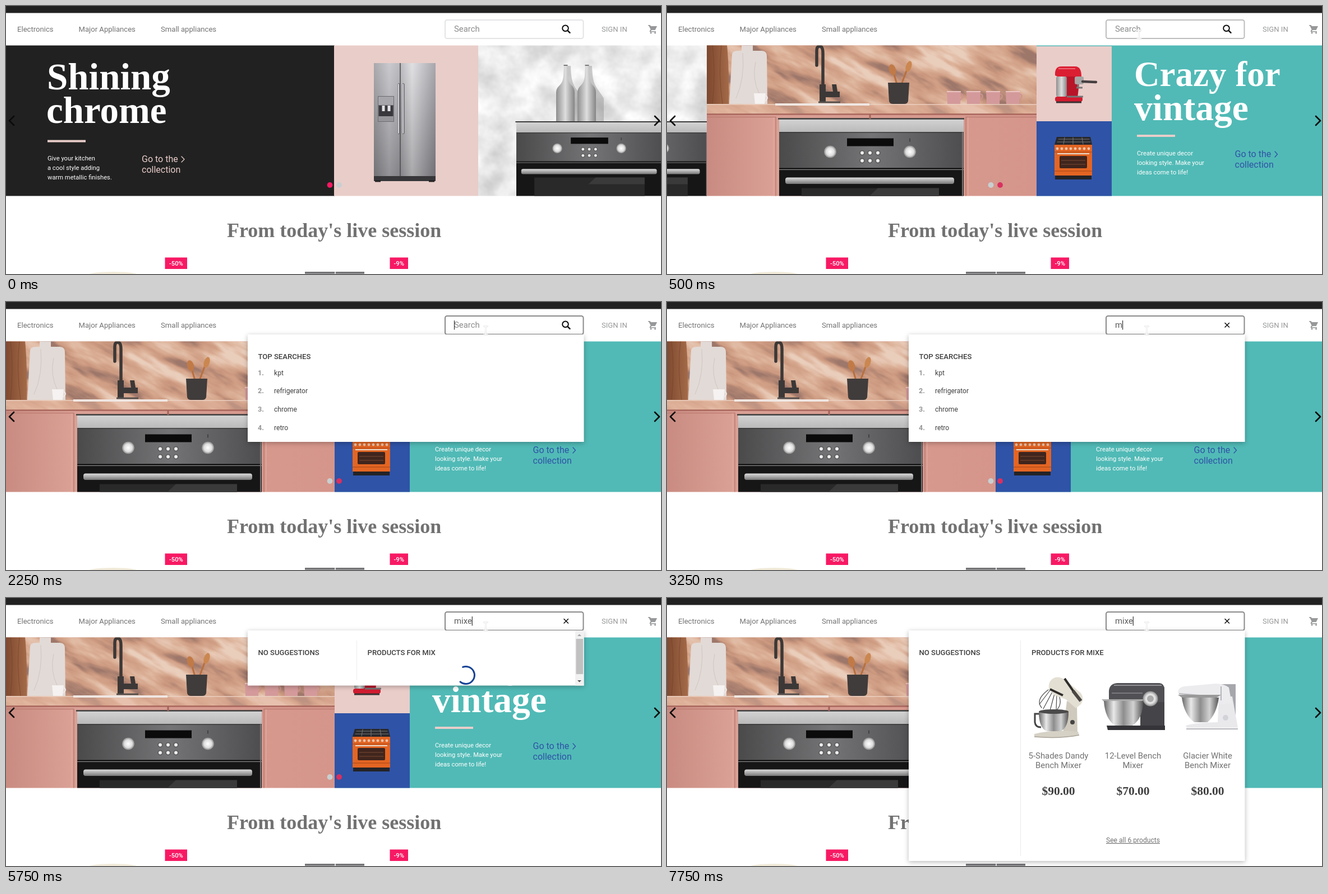
Recreate the animation shown at these times as an HTML page. Size 1168 px wide and 479 px high, loop 8 s.

```html
<!DOCTYPE html>
<html lang="en">
<head>
<meta charset="utf-8">
<title>Appliance store search</title>
<style>
html, body { margin: 0; width: 100%; height: 100%; overflow: hidden; background: #fff; }
svg { display: block; width: 100%; height: 100%; }
text { font: 13.1px Roboto, sans-serif; fill: #727273; white-space: pre; }
.serif { font-family: "Liberation Serif", serif; font-weight: 700; }
.hero { font-size: 67px; fill: #fff; }
.small { font-size: 11.2px; fill: #fff; }
.link { font-size: 16px; }
.head { font-weight: 500; fill: #3f3f40; }
.item { font-size: 12.1px; fill: #3f3f40; }
.num { font-size: 12.6px; font-weight: 700; fill: #979899; }
.badge { font-size: 11.3px; font-weight: 500; fill: #fff; }
.field { font-size: 14.9px; }
.name { font-size: 14.9px; text-anchor: middle; }
.price { font-size: 21.5px; fill: #3f3f40; text-anchor: middle; }
.line { fill: none; stroke-linecap: round; stroke-linejoin: round; }
#sheet { filter: drop-shadow(0 2px 4px rgba(0,0,0,.28)); }
</style>
</head>
<body>
<svg viewBox="0 0 1168 479" preserveAspectRatio="none">
<defs>
  <clipPath id="heroClip"><rect y="70.5" width="1168" height="269"/></clipPath>
  <clipPath id="slabClip"><path d="M-2 70H586V193H-2z"/></clipPath>
  <clipPath id="wallClip"><path d="M842 70H1173V341H842z"/></clipPath>
  <filter id="marble" x="0" y="0" width="1" height="1" color-interpolation-filters="sRGB">
    <feTurbulence type="fractalNoise" baseFrequency=".009 .035" numOctaves="4" seed="4"/>
    <feColorMatrix values="2 0 0 0 -.5 2 0 0 0 -.5 2 0 0 0 -.5 0 0 0 0 1"/>
    <feComponentTransfer>
      <feFuncR type="table" tableValues=".62 .80 .86 .92"/>
      <feFuncG type="table" tableValues=".47 .60 .69 .81"/>
      <feFuncB type="table" tableValues=".42 .50 .59 .74"/>
    </feComponentTransfer>
  </filter>
  <filter id="plaster" x="0" y="0" width="1" height="1" color-interpolation-filters="sRGB">
    <feTurbulence type="fractalNoise" baseFrequency=".02" numOctaves="4" seed="7"/>
    <feColorMatrix values=".3 0 0 0 .77 .3 0 0 0 .77 .3 0 0 0 .77 0 0 0 0 1"/>
  </filter>
  <linearGradient id="steel">
    <stop offset="0" stop-color="#8d8c91"/><stop offset=".25" stop-color="#b9b8bd"/>
    <stop offset=".42" stop-color="#a3a2a7"/><stop offset=".62" stop-color="#d6d5d9"/>
    <stop offset="1" stop-color="#8b8a90"/>
  </linearGradient>
  <linearGradient id="shade" x2="0" y2="1">
    <stop offset="0" stop-color="#fff" stop-opacity=".25"/><stop offset="1" stop-color="#222" stop-opacity=".25"/>
  </linearGradient>
  <linearGradient id="strip" x2="0" y2="1">
    <stop offset="0" stop-color="#d4d4d4"/><stop offset="1" stop-color="#b9b9b9"/>
  </linearGradient>
  <linearGradient id="body">
    <stop offset="0" stop-color="#4a4a4b"/><stop offset=".5" stop-color="#747476"/><stop offset="1" stop-color="#4d4d4f"/>
  </linearGradient>
  <linearGradient id="bar" x2="0" y2="1">
    <stop offset="0" stop-color="#ddd"/><stop offset="1" stop-color="#777"/>
  </linearGradient>
  <linearGradient id="cabinet">
    <stop offset="0" stop-color="#c98b81"/><stop offset=".2" stop-color="#daa095"/><stop offset="1" stop-color="#d5958a"/>
  </linearGradient>
  <linearGradient id="wood">
    <stop offset="0" stop-color="#7d482f"/><stop offset="1" stop-color="#a46a48"/>
  </linearGradient>
  <linearGradient id="glass">
    <stop offset="0" stop-color="#8f8f8f"/><stop offset=".5" stop-color="#dedede"/><stop offset="1" stop-color="#858585"/>
  </linearGradient>
  <linearGradient id="bowl">
    <stop offset="0" stop-color="#666"/><stop offset=".25" stop-color="#e8e8e8"/><stop offset=".5" stop-color="#8d8d8d"/>
    <stop offset=".75" stop-color="#d2d2d2"/><stop offset="1" stop-color="#555"/>
  </linearGradient>
  <radialGradient id="knob"><stop offset="0" stop-color="#fff"/><stop offset=".65" stop-color="#ddd"/><stop offset="1" stop-color="#888"/></radialGradient>

  <g id="oven">
    <rect width="329" height="180" fill="#161617"/>
    <rect width="329" height="24" fill="url(#strip)"/>
    <path d="M-2 0H330" stroke="#3c3c3c" stroke-width="2.5"/>
    <rect y="24" width="329" height="64" fill="url(#body)"/>
    <path d="M0 24.500H329M0 88H329" stroke="#2b2b2b"/>
    <path d="M0 91H329" stroke="#999"/>
    <rect x="121" y="35" width="83" height="14" fill="#0b0b0c"/>
    <path d="M233 35V41" stroke="#222"/>
    <g id="knobs"></g>
    <rect x="40" y="124" width="245" height="60" fill="#29292a"/>
    <path d="M160 139L176 124H285V139z" fill="#3a3a3b"/>
    <rect x="11" y="105" width="301" height="11.500" rx="4" fill="url(#bar)"/>
    <path d="M327 24V180" stroke="#777" stroke-width="2"/>
  </g>
  <g id="bottle">
    <path d="M14 2H26C27 40 34 38 47 60V101H14z" fill="#8e8e8e" opacity=".45"/>
    <path d="M14 0H20C20 26 21 30 29 38Q33 43 33 50V101H0V50Q0 43 5 38C13 30 13 26 14 0z" fill="url(#glass)"/>
    <path d="M13.500 1H20.500" stroke="#777" stroke-width="2"/>
  </g>
</defs>

<rect width="1168" height="479" fill="#fff"/>

<g clip-path="url(#heroClip)">
<g id="track">
  <g>
    <rect y="70" width="586" height="271" fill="#212121"/>
    <rect x="585" y="70" width="257" height="271" fill="#e9cdc9"/>
    <text class="serif hero" x="73" y="149">Shining</text>
    <text class="serif hero" x="72" y="209">chrome</text>
    <rect x="74" y="239.500" width="68" height="4" fill="#e9cdc9"/>
    <text class="small" x="74" y="276">Give your kitchen</text>
    <text class="small" x="74" y="293">a cool style adding</text>
    <text class="small" x="74" y="310">warm metallic finishes.</text>
    <text class="link" x="242" y="279" style="fill:#e9cdc9">Go to the</text>
    <text class="link" x="242" y="298" style="fill:#e9cdc9">collection</text>
    <path class="line" d="M313 269L318 274L313 279" stroke="#e9cdc9" stroke-width="1.300"/>

    <rect x="656" y="304" width="110" height="9" fill="#37373a"/>
    <path d="M658 313H668M754 313H764" stroke="#222" stroke-width="3"/>
    <rect x="656" y="102" width="110" height="202" fill="url(#steel)"/>
    <rect x="656" y="102" width="110" height="202" fill="url(#shade)"/>
    <path d="M703 102V304" stroke="#4a4a4e" stroke-width="1.500"/>
    <path class="line" d="M700.500 140V227M708.500 140V227" stroke="#68676c" stroke-width="4"/>
    <path class="line" d="M700 140V227M708 140V227" stroke="#d3d2d6" stroke-width="2"/>
    <rect x="663" y="161" width="29" height="46" fill="#6b6a70"/>
    <rect x="664" y="162" width="27" height="15" fill="#a7a6ab"/>
    <rect x="665" y="178" width="25" height="19" fill="#39393d"/>
    <path d="M673 178V188M683 178V188" stroke="#e4e4e6" stroke-width="5"/>
    <rect x="664" y="197" width="27" height="9" fill="#96959a"/>

    <g clip-path="url(#wallClip)">
      <rect x="842" y="70" width="333" height="271" filter="url(#plaster)"/>
      <use href="#bottle" x="981" y="105"/>
      <use href="#bottle" x="1019" y="105"/>
      <use href="#oven" transform="translate(910 207) scale(.803)"/>
    </g>
  </g>

  <g transform="translate(1175)">
    <rect x="-2" y="70" width="588" height="271" fill="url(#cabinet)"/>
    <g clip-path="url(#slabClip)">
      <rect x="-60" y="-110" width="710" height="480" filter="url(#marble)" transform="rotate(28 290 130)"/>
      <rect x="-2" y="176" width="588" height="17" fill="#e2b19b" opacity=".45"/>
    </g>
    <path d="M-2 176H586" stroke="#ecd0c2" stroke-width="1.500"/>
    <path d="M-2 193.500H586" stroke="#a9665c" stroke-width="2.500"/>
    <path d="M-2 198.500H121V341M460 341V198.500H586" fill="none" stroke="#bd7b71" stroke-width="1.500"/>
    <path d="M117 199V341M464 199V341" stroke="#e0a99e" stroke-width="1.500"/>
    <path d="M-2 70H34Q38 110 37 175H-2z" fill="url(#wood)"/>
    <path d="M8 70Q14 120 8 175M24 70Q18 120 26 175" fill="none" stroke="#6f3e27" opacity=".6"/>
    <path d="M38 175L43 86Q44 80 53 80H60V70H80V80H96Q105 80 105 90L106 175z" fill="#e2dad6"/>
    <path d="M50 165Q66 130 62 84M85 100Q78 130 92 158" fill="none" stroke="#cfc6c1"/>
    <path d="M82 156H103L101 175H84z" fill="#f5f2f1"/>
    <path d="M102 160Q110 163 102 170" fill="none" stroke="#eee8e6" stroke-width="2"/>
    <path d="M120 176H288" stroke="#f0e7e3" stroke-width="4"/>
    <path class="line" d="M205 170V84Q205 72 199 72Q194 72 194 80V106" stroke="#3c3837" stroke-width="5.500"/>
    <path d="M199 140H210V153H223L221 140H229L231 153H235V163H210V172H199z" fill="#3c3837"/>
    <path d="M197 172H236" stroke="#55504e" stroke-width="3"/>
    <path class="line" d="M337 140L329 112M345 140L357 108" stroke="#b86f3e" stroke-width="3"/>
    <ellipse cx="329" cy="114" rx="6" ry="10" fill="#c17a47" transform="rotate(-15 329 114)"/>
    <ellipse cx="358" cy="108" rx="5" ry="10" fill="#cb8750" transform="rotate(18 358 108)"/>
    <path d="M321 137H359L357 170Q356 175 350 175H330Q324 175 323 170z" fill="#403c3b"/>
    <g id="cups"></g>
    <use href="#oven" x="127" y="201.500"/>
    <path d="M289 193V202" stroke="#a3655b" stroke-width="3"/>

    <rect x="586" y="70" width="600" height="271" fill="#51bab6"/>
    <rect x="586" y="72" width="134" height="134" fill="#e9cdc9"/>
    <rect x="586" y="206" width="134" height="135" fill="#2f53a7"/>

    <path d="M638 120H664L659 165H636z" fill="#b81529"/>
    <rect x="621" y="126" width="19" height="36" rx="3" fill="url(#glass)"/>
    <path d="M619 124Q618 108 630 108H655Q666 108 666 126H623z" fill="#db1f33"/>
    <path d="M625 112H655" stroke="#ee6673" stroke-width="2"/>
    <rect x="654" y="126" width="16" height="14" rx="3" fill="#a8a5a5"/>
    <path class="line" d="M668 135L692 136" stroke="#463f40" stroke-width="4.500"/>
    <path d="M660 140V145M657 146H668" stroke="#777" stroke-width="3"/>
    <rect x="619" y="162" width="49" height="9" rx="4" fill="#d21c30"/>
    <path d="M640 162H669" stroke="#777" stroke-width="3"/>
    <path d="M621 172H666" stroke="#393233" stroke-width="3"/>

    <path d="M622 234H682L685 248H618z" fill="#29282a"/>
    <path class="line" d="M625 238H680M623 243H682M636 235L634 247M651 235V247M667 235L669 247" stroke="#77777a"/>
    <rect x="618" y="248" width="67" height="55" fill="#e36523"/>
    <path d="M618 261H685M618 295H685" stroke="#a64517"/>
    <g id="dials"></g>
    <path d="M623 264H680" stroke="#e5d9cd" stroke-width="2"/>
    <rect x="627" y="268" width="49" height="22" rx="2" fill="#40251d"/>
    <path d="M630 276H673M630 283H673" stroke="#7b4a32"/>
    <rect x="619" y="303" width="65" height="7" fill="#242326"/>

    <text class="serif hero" x="760" y="143" style="font-size:63px">Crazy for</text>
    <text class="serif hero" x="760" y="204" style="font-size:65.500px">vintage</text>
    <rect x="765" y="230" width="68" height="4" fill="#e9cdc9"/>
    <text class="small" x="765" y="267">Create unique decor</text>
    <text class="small" x="765" y="284">looking style. Make your</text>
    <text class="small" x="765" y="301">ideas come to life!</text>
    <text class="link" x="939.500" y="270" style="fill:#2f53a7">Go to the</text>
    <text class="link" x="939.500" y="289" style="fill:#2f53a7">collection</text>
    <path class="line" d="M1011 260L1015.500 265L1011 270" stroke="#2f53a7" stroke-width="1.300"/>
  </g>
</g>
<path class="line" d="M14 197L6 205L14 213M1157 197L1165 205L1157 213" stroke="#0a0a0a" stroke-width="2.600"/>
<circle id="dotA" cx="577.500" cy="320" r="4.900"/>
<circle id="dotB" cx="594" cy="320" r="4.900"/>
</g>

<text class="serif" x="394" y="413" style="font-size:36px">From today's live session</text>
<ellipse cx="191" cy="481" rx="45" ry="6" fill="#f1ead9"/>
<rect x="533" y="475" width="106" height="5" fill="#8f8f92"/>
<path d="M533 476H639" stroke="#6b6b6e" stroke-width="2"/>
<path d="M587 475V479" stroke="#ddd" stroke-width="2"/>
<rect x="283.500" y="449.500" width="39.500" height="20.500" fill="#f71963"/>
<text class="badge" x="291" y="464">-50%</text>
<rect x="684.500" y="449.500" width="32.500" height="20.500" fill="#f71963"/>
<text class="badge" x="691.500" y="464">-9%</text>

<rect width="1168" height="12.500" fill="#212121"/>
<text x="20" y="45.500">Electronics</text>
<text x="129.500" y="45.500">Major Appliances</text>
<text x="276" y="45.500">Small appliances</text>
<text x="1062" y="45.500" style="fill:#979899">SIGN IN</text>
<g fill="#979899">
  <path d="M1145 34H1148.500L1149.800 36H1161L1157.500 43H1151L1150 45H1159V46.500H1148.500Q1147 46 1148 44L1149.500 42L1146.500 35.500H1145z"/>
  <circle cx="1150" cy="48" r="1.500"/><circle cx="1157.500" cy="48" r="1.500"/>
</g>
<rect id="box" x="783" y="25" width="246.500" height="33" rx="3.500" fill="#fff" stroke-width="2"/>
<text class="field" id="typed" x="799" y="46"></text>
<path id="caret" d="M0 33V49.500" stroke="#333" stroke-width="1.200"/>
<g id="lens" class="line" stroke="#0a0a0a"><circle cx="997.500" cy="39.800" r="5.300" stroke-width="2"/><path d="M1001.500 43.800L1005.500 47.800" stroke-width="2.400"/></g>
<path id="clear" class="line" d="M995 37.500L1002.500 45M1002.500 37.500L995 45" stroke="#0a0a0a" stroke-width="1.500"/>

<g id="panel">
  <rect id="sheet" x="431" width="599.500" fill="#fff"/>
  <g id="top"><text class="head" x="449.500" y="102">TOP SEARCHES</text></g>
  <g id="found">
    <text class="head" x="449.500" y="102">NO SUGGESTIONS</text>
    <text class="head" id="title" y="102"></text>
    <path id="divider" stroke="#ececec"/>
  </g>
  <g id="loading">
    <rect x="1015" y="58" width="15.500" height="98.500" fill="#f1f1f1"/>
    <rect x="1016.500" y="73" width="12.500" height="63" fill="#c1c1c1"/>
    <path d="M1019 68L1022.500 64.500L1026 68z" fill="#a3a3a3"/>
    <path d="M1019 147L1022.500 150.500L1026 147z" fill="#505050"/>
    <path id="spinner" class="line" d="M807.100 146.300A15.500 15.500 0 1 1 833.900 146.300" stroke="#134295" stroke-width="3"/>
  </g>
  <g id="results">
    <path d="M713 184L731 192L732 243H706z" fill="#cfcabd"/>
    <path d="M655 243Q690 234 733 239L735 245Q700 252 655 248z" fill="#d6d1c5"/>
    <path d="M655 248Q700 252 735 245" fill="none" stroke="#a9a498" stroke-width="1.500"/>
    <path class="line" d="M683 165L664 190M687 168L671 198M691 171L683 201M695 172L694 200M680 164Q656 182 668 196M698 172Q706 190 694 201" stroke="#4a4a4a" stroke-width="1.200"/>
    <path d="M681 163Q679 147 692 142Q700 140 711 147L738 170Q745 180 738 190L729 197L711 181L691 174z" fill="#e3dfd3"/>
    <path d="M683 163L706 174M709 144L727 170" stroke="#2f2d2b" stroke-width="4"/>
    <path d="M724 166L738 184" stroke="#4a4744" stroke-width="6"/>
    <path d="M664 207H656V222Q657 231 667 231" fill="none" stroke="#444" stroke-width="3"/>
    <path d="M663 203H716Q716 232 702 238H677Q663 232 663 203z" fill="url(#bowl)"/>
    <ellipse cx="689.500" cy="203" rx="26.500" ry="4" fill="#4a4a4a"/>
    <circle cx="723" cy="222" r="4" fill="#444"/>

    <path d="M844 160H887V232H844z" fill="#454448"/>
    <path d="M784 228H888V236H786z" fill="#353438"/>
    <path d="M788 181V166Q789 153 803 152H878Q887 153 887 163V186H845z" fill="#515054"/>
    <path d="M797 156H882" stroke="#939297" stroke-width="2"/>
    <path d="M793 170H848" stroke="#8a898d" stroke-width="1.500"/>
    <path d="M775 181H852L846 185H779z" fill="#aaa"/>
    <path d="M779 184H849Q849 215 830 228H799Q781 216 779 184z" fill="url(#bowl)"/>
    <circle cx="862" cy="180" r="13.500" fill="url(#knob)"/><circle cx="862" cy="180" r="6" fill="#aaa"/>

    <path d="M986 154H1014V230H986z" fill="#a6a7ac"/>
    <path d="M925 228Q945 222 982 222L984 176H1008L1018 232H927z" fill="#e9e9ec"/>
    <path d="M912 171Q909 161 922 158L978 153Q993 153 1002 160L1007 188L984 190L975 175z" fill="#ececef"/>
    <path d="M913 171L975 176M926 234H1018M988 158V183" fill="none" stroke="#b5b6bb" stroke-width="2"/>
    <path d="M911 173H988L980 178H918z" fill="#999"/>
    <path d="M918 178H984Q980 208 964 222H940Q922 208 918 178z" fill="url(#bowl)"/>
    <circle cx="996" cy="214" r="5" fill="#d2d3d8"/>
    <text x="783" y="437" style="font-size:12.100px;text-decoration:underline">See all 6 products</text>
  </g>
</g>
<g id="pointer" class="line">
  <path d="M-3.500 43.500H3.500M0 43.500V58.500M-3.500 58.500H3.500" stroke="#e4e4e4" stroke-width="2.400"/>
  <path d="M-3.500 43.500H3.500M0 43.500V58.500M-3.500 58.500H3.500" stroke="#fff"/>
</g>
</svg>
<script>
const LOOP = 8000, STEP = 250;
const $ = id => document.getElementById(id);
const show = (id, on) => { $(id).style.display = on ? '' : 'none'; };
const set = (id, attrs) => { for (const a in attrs) $(id).setAttribute(a, attrs[a]); };

function add(parent, tag, attrs, text) {
  const el = document.createElementNS('http://www.w3.org/2000/svg', tag);
  for (const a in attrs) el.setAttribute(a, attrs[a]);
  if (text) el.textContent = text;
  $(parent).appendChild(el);
}

function build() {
  for (const cx of [91, 233]) add('knobs', 'circle', {cx, cy: 59, r: 11, fill: 'url(#knob)'});
  for (let i = 0; i < 6; i++)
    add('knobs', 'circle', {cx: 148 + i % 3 * 14, cy: i < 3 ? 61 : 75, r: 4, fill: 'url(#knob)', stroke: '#444'});
  for (let i = 0; i < 8; i++) add('dials', 'circle', {cx: 623 + i * 8, cy: 255, r: 2.4, fill: '#e9c5ad'});

  for (let i = 0; i < 4; i++) {
    const x = 426 + i * 35;
    add('cups', 'path', {d: `M${x} 152h25l-1 23h-23z`, fill: '#d49a9b'});
    add('cups', 'path', {d: `M${x + 25} 157q8 4 -1 11`, fill: 'none', stroke: '#cf9292', 'stroke-width': 2});
    add('cups', 'path', {d: `M${x} 153h25`, stroke: '#ecc4c2', 'stroke-width': 2});
  }

  ['kpt', 'refrigerator', 'chrome', 'retro'].forEach((word, i) => {
    const y = 130.5 + i * 32.7;
    add('top', 'text', {class: 'num', x: 449, y}, i + 1 + '.');
    add('top', 'text', {class: 'item', x: 478, y}, word);
  });
  [['5-Shades Dandy', 'Bench Mixer', '$90.00'],
   ['12-Level Bench', 'Mixer', '$70.00'],
   ['Glacier White', 'Bench Mixer', '$80.00']].forEach(([a, b, price], i) => {
    const x = 698 + i * 133;
    add('results', 'text', {class: 'name', x, y: 287}, a);
    add('results', 'text', {class: 'name', x, y: 304}, b);
    add('results', 'text', {class: 'serif price', x, y: 352}, price);
  });
}

function drawField(k) {
  const blink = Math.floor((k - 5) / 2);
  const count = blink < 4 ? 0 : blink < 6 ? blink - 3 : blink < 9 ? 3 : 4;
  const field = $('typed');
  field.textContent = 'mixe'.slice(0, count) || 'Search';
  field.style.fill = count ? '#5a5a5b' : '#8b8c8d';
  show('caret', k >= 5 && '10101110110101'[blink] === '1');
  const end = count ? field.getComputedTextLength() : 0;
  set('caret', {transform: `translate(${799.5 + end})`});
  set('box', {stroke: k < 1 ? '#e3e4e6' : k < 5 ? '#bdbdbe' : '#8a8a8b'});
  show('lens', !count);
  show('clear', count);
}

function drawPanel(k) {
  const loading = k >= 21 && k < 28, results = k >= 28;
  const lift = k === 5 ? 1 : k === 6 ? .25 : 0;
  const y = 58 + 8 * lift;
  const bottom = results ? 470 : loading ? 156.5 : 250 - 18 * lift;
  show('panel', k >= 5);
  set('panel', {opacity: 1 - .61 * lift});
  set('sheet', {y, height: bottom - y});
  set('top', {transform: `translate(0 ${-12.3 * lift})`});
  show('top', k < 21);
  show('found', k >= 21);
  show('loading', loading);
  show('results', results);
  $('title').textContent = 'PRODUCTS FOR MIX' + (k < 25 ? '' : 'E');
  set('title', {x: results ? 650 : 644.5});
  set('divider', {d: results ? 'M630.5 76V461' : 'M625.5 76V147'});
  set('spinner', {transform: `rotate(${(k - 27) * 65} 820.500 138)`});
}

function update(k) {
  const shift = [0, 3, 1102, 1175][Math.min(k, 3)];
  set('track', {transform: `translate(${-shift})`});
  set('dotA', {fill: k < 2 ? '#f71963' : '#c9cfd1'});
  set('dotB', {fill: k < 2 ? '#c9cfd1' : '#d9305f'});
  show('pointer', k >= 2);
  set('pointer', {transform: `translate(${k < 3 ? 842 : k < 4 ? 851 : 855.5})`});
  drawField(k);
  drawPanel(k);
}

build();
const start = performance.now();
let shown = -1;
function tick() {
  const k = Math.floor((performance.now() - start) % LOOP / STEP);
  if (k !== shown) update(shown = k);
  requestAnimationFrame(tick);
}
tick();
</script>
</body>
</html>
```
